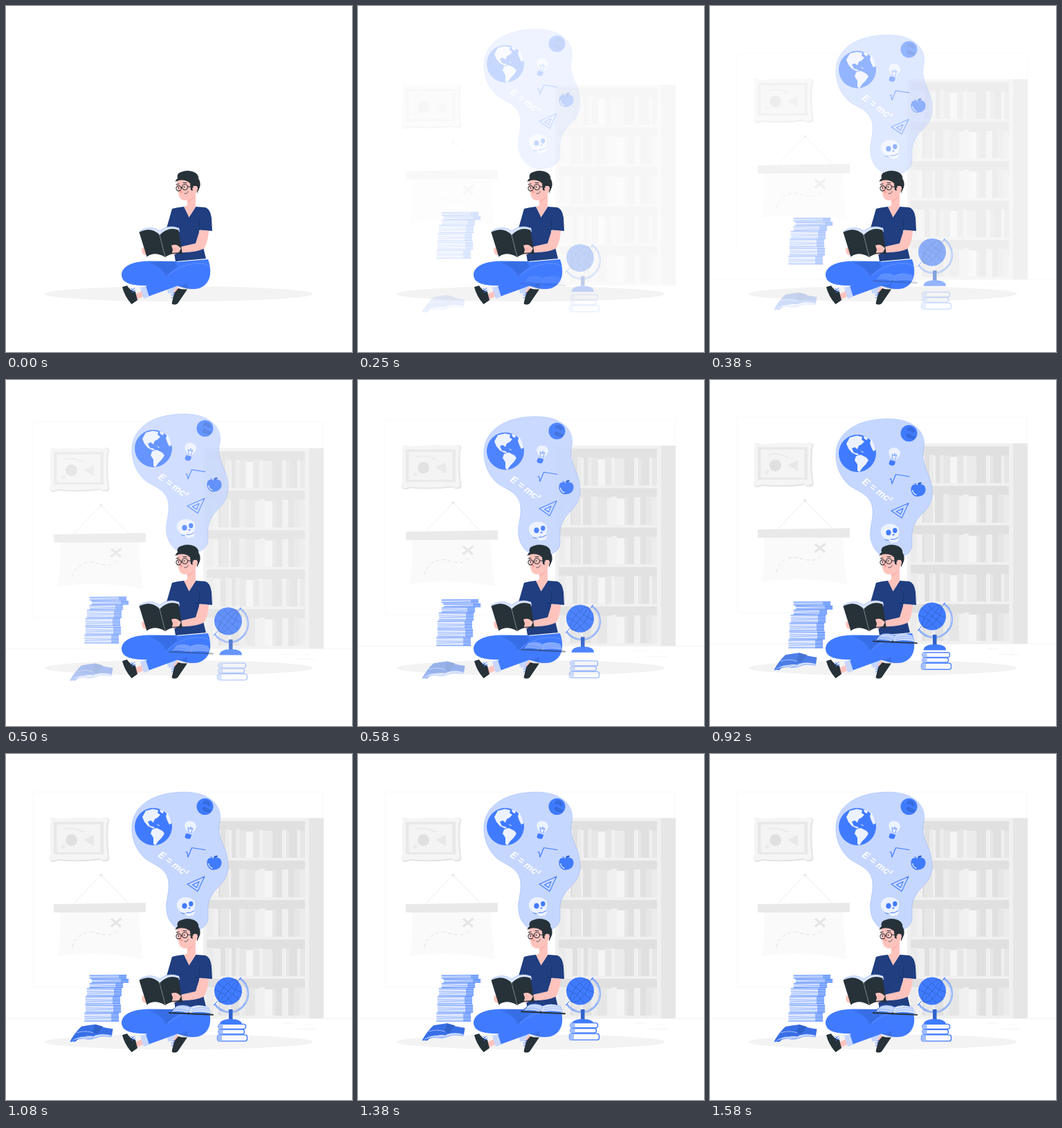
Animation, 500 px wide and 500 px high, one loop 1.62 s. Source, as an HTML page:

```html
<!DOCTYPE html>
<html lang="en">
<head>
<meta charset="utf-8">
<style>
html, body { margin: 0; height: 100%; overflow: hidden; background: #fff; }
svg { display: block; width: 100vw; height: 100vh; }
.blue { fill: #407bff; }
.deep { fill: #3062cc; }
.pale { fill: #c6d7ff; }
.ink { fill: #263238; }
.skin { fill: #ffc3bd; }
.navy { fill: #203e80; }
.white { fill: #ecf2ff; }
.line { fill: none; stroke: #407bff; stroke-linecap: round; stroke-linejoin: round; }
.dark { fill: none; stroke: #263238; stroke-linecap: round; }
</style>
</head>
<body>
<svg viewBox="0 0 500 500">
  <g data-from="30" data-span="1000">
    <path d="M39 55H458.500V337H39Z" fill="none" stroke="#f5f5f5" stroke-width=".7"/>
    <path d="M0 382.400H500" stroke="#ebebeb" stroke-width=".6"/>
    <path d="M400 389.500H416M418 397.500H448M432 391H438" stroke="#ebebeb" stroke-width=".5"/>
    <g id="shelves"></g>

    <!-- framed picture -->
    <path d="M65 95q-2-3 2-3l8 2q32-3 62-1 6-3 11 0 3 3 0 7-2 25 1 47 2 7-3 8-5 1-9-2-30 4-62 1-8 4-11 0-2-4 1-8-2-26 0-51Z" fill="#e3e3e3"/>
    <path d="M64 94q-1-3 3-2l8 2q32-3 61-1 6-3 10 0 3 3 0 7-2 25 1 46 2 6-3 7-5 1-9-2-30 4-60 1-8 4-11 0-2-4 1-8-2-25 0-50Z" fill="#f5f5f5"/>
    <path d="M69 98H141V145H69Z" fill="#e8e8e8"/>
    <path d="M73.500 101.500H136.500V142H73.500Z" fill="#f4f4f4"/>
    <circle cx="94.500" cy="124.500" r="8.500" fill="#e0e0e0"/>
    <path d="M112 124L127 117V133Z" fill="#e8e8e8"/>
    <circle cx="82.500" cy="134" r="3" fill="#ebebeb"/>
    <path d="M84 109Q100 105 113 113" fill="none" stroke="#ebebeb" stroke-width="2"/>

    <!-- hanging map -->
    <path d="M98 216L137.500 175 177 216" fill="none" stroke="#e0e0e0" stroke-width=".6"/>
    <circle cx="137.500" cy="175" r="1.700" fill="#e0e0e0"/>
    <path d="M78 227H192Q192 265 199 296.500 140 284 74 292.500 81 260 78 227Z" fill="#fafafa"/>
    <path d="M69 217L202 215V228.500L69 229Z" fill="#e9e9e9"/>
    <path d="M95.500 279C100 262 115 255 127 258S155 266 162 252" fill="none" stroke="#e0e0e0" stroke-width="1" stroke-dasharray="5 4"/>
    <path d="M152 238L166 250M166.500 237.500L151.500 249.500" stroke="#e6e6e6" stroke-width="3.500"/>
  </g>

  <ellipse cx="249.500" cy="416" rx="194" ry="11" fill="#f3f3f3"/>

  <g data-from="-30" data-span="1000" id="pile"></g>

  <g data-from="-30" data-span="1000">
    <path class="pale" stroke="#407bff" stroke-width=".4" stroke-dasharray="1.500 1" d="M182 107C182 75 213 55 257 55 291 55 311 71 309.500 94 308 104 306 108 310 121 314 135 321 142 321 163 320 185 306 190 298 203 290 216 292 225 292 236 292 248 282 257 262 257 244 256 231 240 231.500 219 233 203 238 191 233 177 226 160 207 159 197 147 186 135 182 121 182 107Z"/>

    <circle class="blue" cx="213" cy="105" r="27"/>
    <path class="white" d="M197 91L202 82 212 79.500 220 81 219 85 223 88 219 92 215 94 213 99 209 96 205 98 208 104 213 105 216 108 211 107 205 104 200 98ZM211 109L218 107 226 111 229 115 225 121 220 126 216 132 213 130 213 121 209 115ZM233 84L237 92 239.500 100 236 102 233 96 231 90ZM222 80L228 82 227 86 223 84ZM217 101l5 2-1 1Z"/>

    <circle class="blue" cx="287.500" cy="76" r="12"/>
    <path class="deep" opacity=".65" d="M285 69q5-4 9 0l3 5-5 1-3-3-4 1ZM284 77q5-2 7 2l6 2-3 4q-6-2-10-3Z"/>

    <path class="white" d="M263 112C258 109 257 102 260 99 265 94 275 98 275 105 275 109 271 111 269.500 114Z"/>
    <path class="line" stroke-width=".7" d="M264 113L263 106 265.500 109 267 105 267.500 109 270 107 267.500 114"/>
    <path class="blue" d="M260.500 114.500L268 116.500 267 121 264.500 123 259 121.500 258.500 119Z"/>
    <path class="line" stroke-width="1.200" stroke-linejoin="miter" d="M260 142L261.500 141.500 263 149 268.500 135.500 288 138.500"/>

    <path class="blue" d="M299 151C294 148 290 152 290.500 158 291 165 297 169 302 167 309 167 313 160 311 154 309 149 304 149 299 151Z"/>
    <path class="line" stroke-width="1.200" d="M299 152Q298 149 296 148.500"/>
    <path class="deep" d="M300 150q1-4 6-3-1 4-6 3Z"/>
    <path d="M292.500 158q1 6 6 7" fill="none" stroke="#ecf2ff" stroke-width="1.300"/>

    <path class="line" stroke-width="1.100" d="M262 188L287 177 277 198.500ZM269.500 189L279 184.500 275.500 193Z"/>

    <path class="white" d="M248 223C244 213 252 207 260 207 269 207 275 213 273 220L272 223 273 228 271 233 262 234.500 259 230 253 229Z"/>
    <ellipse class="blue" cx="258" cy="219.500" rx="3.600" ry="4"/>
    <ellipse class="blue" cx="267.300" cy="216.500" rx="3.200" ry="3.700"/>
    <path class="blue" d="M263 224l2-3 2 2Z"/>
    <path class="line" stroke-width="1" d="M253 229.500q2 2 5 1M261 229.500q6 1 11-3"/>

    <text transform="translate(219 147.500) rotate(36.500)" fill="#fff" font-family="Liberation Sans, Arial, sans-serif" font-size="14" font-weight="700" font-style="italic">E = mc²</text>
  </g>

  <!-- reader -->
  <g>
    <path class="skin" d="M196 350L204 348 204 360Q197 360 196.500 355Z"/>
    <path class="skin" d="M240 408L247 405 250 410 243 416Z"/>
    <path class="ink" d="M249 408Q255 410 262 409.500L248 430Q243 433 239.500 430L243 415Z"/>
    <path class="line" stroke-width=".9" d="M240 414l4 1M239 418l4-1M242 420l-3 2"/>
    <path class="pale" d="M233 410L242 403 247 405 240 416 234 415Z"/>
    <path class="blue" d="M167 388C168 376 182 369 207 368.500L246 369 275 385 245 404C230 410 215 404 195 404 178 403 167 399 167 388Z"/>
    <path class="deep" opacity=".5" d="M207 371.500Q226 377 231 391L248 376 243 369H221Z"/>
    <path class="skin" d="M186 417L198 411 200 419 190 424Z"/>
    <path class="ink" d="M168 406L175 404Q179 411 187 413L190 425 181.500 431Q171 419 168 406Z"/>
    <path class="line" stroke-width=".9" d="M180 411l6-3M182 414l5-3M181 408l4 4"/>
    <path class="blue" d="M244 370L292 366Q296 377 295 388C293 402 283 409 271 409 258 409 254 404 246 405L205 420 199 407 234 389 252 374Z"/>
    <path class="deep" opacity=".5" d="M247 404Q256 405 263 399 258 408 271 409 257 410 247 404Z"/>
    <path d="M234 389Q252 374 274 372 287 371 294 376" fill="none" stroke="#7aa2ff" stroke-width=".6"/>
    <path class="pale" d="M194 407L202 404.500 207 420 199 423Z"/>

    <path class="skin" d="M262 275L274 267 274 291 264 307 256 291 262 288Z"/>
    <path d="M262 281Q269 279 272 272 271 282 262 284Z" fill="#f9b5ae"/>
    <path class="navy" d="M240 293Q247 291 257 290L264.500 305.500 274.500 290 288 291Q295 293 297 306L298 325 279 324 289 365 245 369 240 340 232 321Z"/>
    <path d="M280 307L279 324 273 322" fill="none" stroke="#182f62" stroke-width=".7"/>
    <path class="skin" d="M280 323.500L293 325Q291 346 285 351 273 357 250 356L242 360Q238 354 239 346L247 345 252 348 274 343Z"/>

    <path class="skin" d="M247 252Q259 246 270 253L277 261Q279 268 272 272 269 281 258 281 250 280 249 270 246 260 247 252Z"/>
    <path class="ink" d="M244.500 254Q245 251 248 249 246 242 253 240 262 236 272 240 279 244 278 249 282 255 280 262L276 271Q277 261 272 260 268 261 270 267L267 266 266 256Q257 249 247 253Z"/>
    <path class="skin" d="M271 261Q277 258 277 264 276 270 271 271Z"/>
    <g class="dark" stroke-width="1.100">
      <circle cx="249.500" cy="263.500" r="3.600"/>
      <circle cx="258.500" cy="261.800" r="4"/>
      <path d="M253.200 262.700h1.200M262.500 261l8 1M246 258l4-1M256 255.500h5"/>
    </g>
    <circle class="ink" cx="249.500" cy="263" r=".9"/>
    <circle class="ink" cx="257.500" cy="261.500" r=".9"/>
    <path d="M253 264l-1 5 3 0" fill="none" stroke="#e86c65" stroke-width=".8"/>
    <path class="dark" stroke-width=".8" d="M258 271q4 1 5-3"/>

    <!-- held book -->
    <path fill="#dbe5ff" stroke="#86a9f5" stroke-width=".5" d="M193 325Q209 316 222 325 235 315 250 321L251 326 222 334 194 329Z"/>
    <path class="ink" d="M192.500 327Q210 318 222 331 235 318 249.500 324L255 359Q241 355 230 363 215 354 203.500 362.500Z"/>
    <path d="M222 331L230 362" stroke="#fff" stroke-width=".6" stroke-dasharray="2 1"/>
    <path class="skin" d="M239 346Q244 344 248 346L253 350 250 356 240 357 241 352Z"/>
    <path d="M241 350l6 1M241 353l5 0" stroke="#e8958f" stroke-width=".5"/>
  </g>

  <g data-from="30" data-span="1000">
    <circle class="blue" cx="321" cy="342.500" r="20"/>
    <g fill="none" stroke="#2b58b8" stroke-width=".6" transform="rotate(38 321 342.500)">
      <ellipse cx="321" cy="342.500" rx="8" ry="20"/>
      <path d="M321 322.500V362.500M301 342.500H341M304 332Q321 338 338 332M304 353Q321 347 338 353"/>
    </g>
    <path class="line" stroke-width="2.200" d="M338.500 324.500A26.500 26.500 0 1 1 302 362"/>
    <path d="M338.500 324.500A26.500 26.500 0 1 1 302 362" fill="none" stroke="#fff" stroke-width=".9"/>
    <path class="line" stroke-width="1" d="M335.500 328l4-5M306 357l-6 6"/>
    <path class="deep" d="M322 369H327.500V385H322Z"/>
    <path class="blue" d="M308.500 391.500Q309 383 325 383T341 391.500Z"/>
  </g>

  <g data-from="30" data-span="1620">
    <!-- open book on the floor -->
    <path fill="#396fe6" d="M92.500 415.500Q100 402 109 394 119 392 129 391 141 396 154.500 397.500L153 407Q139 403 130 408L116 408Q106 410 100 416Z"/>
    <path class="deep" d="M129 391L140 394 131 406 125 402Z"/>
    <path d="M93 416Q103 408 115 408.500 122 413 129 406.500 140 403 153 407L151.500 409Q138 406 130 410 120 414 113 411 103 411 93 416Z" fill="#dbe5ff" stroke="#407bff" stroke-width=".7"/>
    <path d="M102 403Q114 399 126 403" fill="none" stroke="#c6d7ff" stroke-width=".7"/>

    <g id="trio"></g>

    <!-- open book on the knee -->
    <path class="pale" stroke="#407bff" stroke-width=".5" d="M237 373.500L247 364.500Q258 361 267 366 278 361 292 366L296 375Q278 371 264 375 250 370 237 373.500Z"/>
    <path class="deep" d="M236 373.500L245.500 365.500 240 372.500Z"/>
    <path d="M264 374.500L267 366Q278 361 292 366L296 374.500Q278 371 264 374.500Z" fill="#dbe5ff"/>
    <path class="line" stroke-width=".4" d="M267 366L264 374M243 370q11-3 20 2M269 369q12-4 24-1M268 372q14-4 26-1"/>
    <path class="dark" stroke-width="2" stroke-linecap="butt" d="M236 374.200L264 375.400 299 377"/>
    <circle class="ink" cx="264" cy="375" r="1.700"/>
  </g>
</svg>
<script>
const byId = id => document.getElementById(id);
const rect = (x, y, w, h, fill, extra = '') =>
  `<rect x="${x}" y="${y}" width="${w}" height="${h}" fill="${fill}" ${extra}/>`;

// Each pair of a shelf is a book width and its shade
const greys = ['#e0e0e0', '#e6e6e6', '#ebebeb', '#f0f0f0', '#f5f5f5'];
const shelfA = '10 2,10 3,7 0,6 2,3 3,6 0,6 2,9 1,10 4,9 1,5 3,14 2,14 0,6 3,5 1,11 0,4 3,7 1';
const shelfB = '9 2,8 3,3 0,12 1,3 3,12 0,9 2,14 1,6 3,8 3,11 4,5 1,9 0,9 3,8 0,8 1,8 2';
let shelves = rect(285, 92.5, 153, 289.5, '#f0f0f0') + rect(438, 92.5, 21, 289.5, '#e6e6e6');
[shelfA, shelfB, shelfB, shelfA, shelfB].forEach((shelf, row) => {
  const top = 97 + row * 57;
  let x = 290;
  shelves += rect(290, top, 142, 53, '#e0e0e0');
  shelf.split(',').forEach((book, i) => {
    const [w, shade] = book.split(' ').map(Number);
    const drop = shade === 4 ? 15 : 12 + i % 3;
    shelves += rect(x, top + drop, w, 53 - drop, greys[shade]);
    x += w;
  });
});
byId('shelves').innerHTML = shelves;

// Paper stack: left, top, width, height
const stack = [[121, 319.5, 53, 5], [124, 325, 53, 5.5], [121, 331, 48, 7], [117, 338.5, 50, 11],
  [115, 350.5, 50, 11], [115, 362.5, 51, 11], [113.5, 374.5, 49.5, 12]];
byId('pile').innerHTML = stack.map(([x, y, w, h], i) => {
  const mid = y + h / 2, r = x + w;
  return rect(x, y, w, h, '#dbe5ff') + rect(r - 11, y, 11, h, '#8cb0ff') +
    `<path class="line" stroke-width=".8" d="M${x} ${y + .5}L${r} ${y + (i % 2)}M${x} ${y + h - .5}H${r}"/>` +
    `<path class="line" stroke-width=".4" d="M${x} ${mid - 1}L${r} ${mid}M${x + 1} ${mid + 2}L${r - 12} ${mid + 1}"/>`;
}).join('');

byId('trio').innerHTML = [[307, 390.5, 39.5, 7], [307, 398.3, 37.5, 6.5], [305.5, 406, 43, 9]].map(([x, y, w, h]) =>
  rect(x, y, w, h, '#f7f9ff', 'rx="3" stroke="#407bff" stroke-width="1.4"') +
  rect(x, y, 6.5, h, '#a0bdff', 'rx="1"')).join('');

// cubic-bezier(.36, -.01, .5, 1.38)
const bezier = (a, b, s) => 3 * (1 - s) ** 2 * s * a + 3 * (1 - s) * s * s * b + s ** 3;
function ease(t) {
  if (t >= 1) return 1;
  let lo = 0, hi = 1;
  for (let i = 0; i < 24; i++) {
    const mid = (lo + hi) / 2;
    if (bezier(.36, .5, mid) < t) lo = mid; else hi = mid;
  }
  return bezier(-.01, 1.38, lo);
}

// Everything stays hidden for the first HOLD ms
const LOOP = 1620, LEAD = 30, HOLD = 40;
const layers = [...document.querySelectorAll('[data-from]')];
function draw() {
  const time = performance.now() % LOOP;
  for (const layer of layers) {
    const p = time < HOLD ? 0 : ease((time + LEAD) / layer.dataset.span);
    layer.setAttribute('transform', `translate(0 ${layer.dataset.from * (1 - p)})`);
    layer.setAttribute('opacity', Math.min(1, Math.max(0, p)));
  }
  requestAnimationFrame(draw);
}
draw();
</script>
</body>
</html>
```
